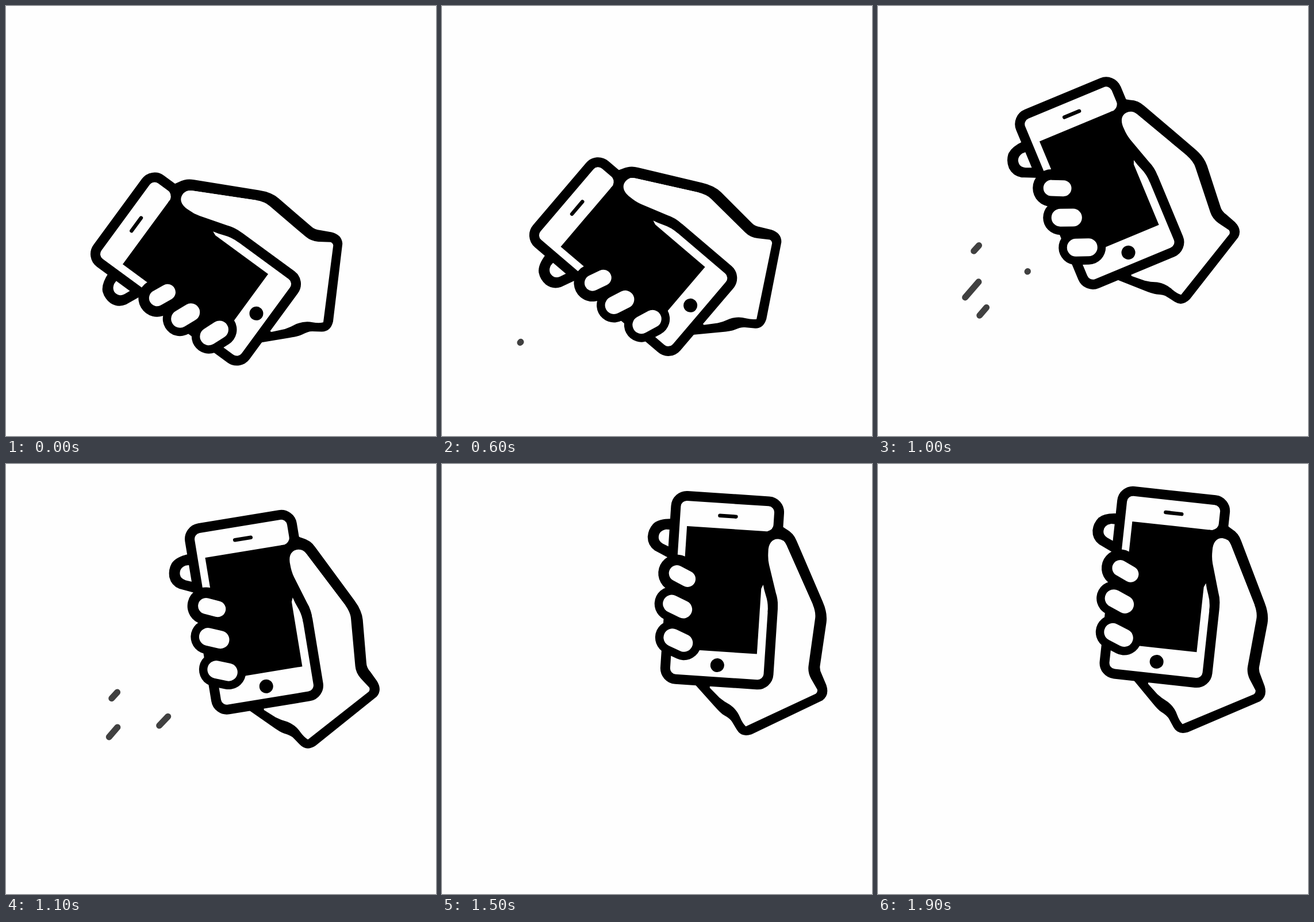
An HTML page that plays this animation: 748x748 px, repeating every 2 s.

```html
<!DOCTYPE html>
<html lang="en">
<head>
<meta charset="utf-8">
<title>Lifting a phone</title>
<style>
  html, body { margin: 0; width: 100%; height: 100%; overflow: hidden; background: #fefefe; }
  svg { display: block; width: 100%; height: 100%; }
  .w { fill: #fefefe; }
  .line { fill: none; stroke: #000; stroke-linecap: round; }
  .tip { stroke: #fefefe; }
  #dashes path { fill: none; stroke: #404040; stroke-width: 11; stroke-linecap: round; }
</style>
</head>
<body>
<svg viewBox="0 0 748 748">
  <g id="dashes"></g>
  <g id="hand">
    <!-- palm and wrist -->
    <path d="M556 110H566Q569 113 575 116Q588 122 594 135L646 237Q656 256 655 273L649 348Q648 356 653 364L662 382Q669 399 657 409L538 476Q521 483 512 470L503 457Q499 451 488 446Q482 443 470 431L434 396V380Z"/>
    <path class="w" d="M562 134Q572 134 577 144L629 243Q636 257 635 268L629 350Q628 362 635 373L647 391Q648 395 645 398L527 463Q521 458 516 448Q510 435 497 427Q486 422 478 416L460 400V380H560V240Z"/>
    <!-- index finger behind the phone -->
    <path d="M376 111Q352 112 343 122Q335 132 335 145Q336 160 349 168L378 181Z"/>
    <path class="w" d="M376 130H366Q354 133 354 144Q354 151 362 155L376 161Z"/>
    <!-- phone -->
    <rect class="w" x="380.5" y="69.5" width="180" height="319.5" rx="19" stroke="#000" stroke-width="17"/>
    <path d="M402 122H538V336H402Z"/>
    <path class="line" stroke-width="6.5" d="M458 100H486"/>
    <circle cx="470.5" cy="360" r="12"/>
    <!-- thumb -->
    <path d="M536 122H542Q552 119 553 107L566 111V262H552Q552 246 547 234Q543 224 541 215L538 222H536Z"/>
    <path class="w" d="M546 158C545 142 552 134 562 134Q572 134 577 144L629 243V256H569Q569 240 564 228L549 180Q546 170 546 158Z"/>
    <!-- gripping fingers -->
    <g class="line">
      <path stroke-width="65" d="M390 205L409 213"/>
      <path stroke-width="60" d="M384.5 258.5L405 267M389.5 317L410 325"/>
      <path class="tip" stroke-width="28" d="M390 205L409 213.5"/>
      <path class="tip" stroke-width="31" d="M384.5 258.5L405 267M389.5 317L410 325"/>
    </g>
  </g>
</svg>
<script>
  const LOOP = 2000, STEP = 100, LIFE = 450;
  const FROM = -53.75, TO = 6.3;
  const hand = document.getElementById('hand');
  const layer = document.getElementById('dashes');

  // start time, origin, travel in x, rise per x, tail easing power
  const dashes = [
    { start: 592, x: 136, y: 585.5, run: 58, rise: 1.16, pow: 3.6 },
    { start: 730, x: 124, y: 539, run: 85, rise: 1.16, pow: 2.2 },
    { start: 880, x: 154, y: 440, run: 81, rise: 1.085, pow: 1.4 },
    { start: 998, x: 260, y: 462, run: 96, rise: 1.05, pow: 1.8 }
  ];
  for (const d of dashes) {
    d.el = document.createElementNS('http://www.w3.org/2000/svg', 'path');
    layer.appendChild(d.el);
  }

  const bezier = (a, b, s) => 3 * (1 - s) * (1 - s) * s * a + 3 * (1 - s) * s * s * b + s * s * s;

  function ease(x) {
    let lo = 0, hi = 1;
    for (let i = 0; i < 30; i++) {
      const mid = (lo + hi) / 2;
      if (bezier(0.84, 0.152, mid) < x) lo = mid; else hi = mid;
    }
    return bezier(0, 1, lo);
  }

  function drawDash(d, t) {
    const p = (t - d.start) / LIFE;
    const visible = p > 0 && p < 1;
    d.el.style.display = visible ? '' : 'none';
    if (!visible) return;
    const at = k => (d.x + d.run * k) + ' ' + (d.y - d.run * d.rise * k);
    d.el.setAttribute('d', 'M' + at(Math.pow(p, d.pow)) + 'L' + at(p));
  }

  function render(ms) {
    const t = Math.floor((ms % LOOP) / STEP) * STEP;
    const angle = FROM + (TO - FROM) * ease(t / LOOP);
    hand.setAttribute('transform', `rotate(${angle} 625.5 482)`);
    dashes.forEach(d => drawDash(d, t));
  }

  const begin = performance.now();
  function tick() {
    render(performance.now() - begin);
    requestAnimationFrame(tick);
  }
  tick();
</script>
</body>
</html>
```
